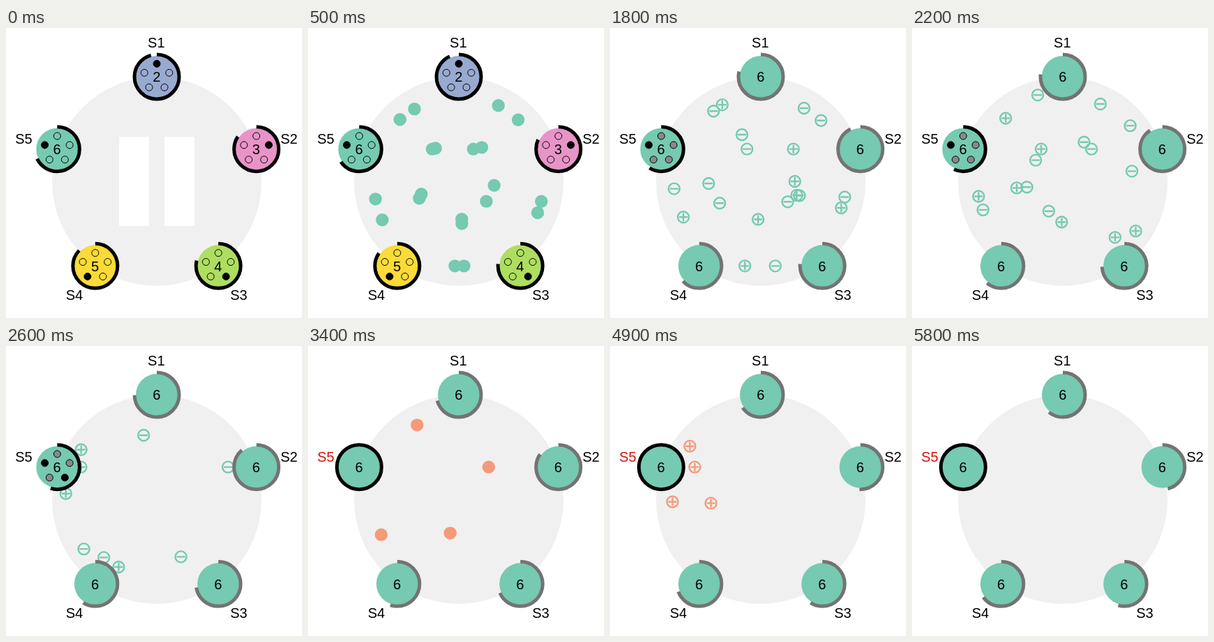
An HTML page with a canvas that plays this animation: 424x416 px, repeating every 5850 ms.

```html
<!DOCTYPE html>
<html lang="en">
<head>
<meta charset="utf-8">
<title>Leader election</title>
<style>
  html, body { margin: 0; width: 100%; height: 100%; overflow: hidden; background: #fff; }
  canvas { display: block; }
</style>
</head>
<body>
<canvas id="stage" width="424" height="416"></canvas>
<script>
const ctx = document.getElementById('stage').getContext('2d');
const LOOP = 5850, STEP = 50, TAU = Math.PI * 2;
const START = 25, WIN = 2621;
const RING = { x: 216, y: 220, r: 150 }, NODE_R = 30, MSG_R = 8;
const DEG_PER_MS = 0.018;
const TEAL = '#75cab1', ORANGE = '#f59a78', GRAY = '#737373';
const TERM_COLORS = { 2: '#99aad1', 3: '#e894c8', 4: '#aedd60', 5: '#fadb37', 6: TEAL };
const LEADER = 4;

// Latencies in ms, [sender][receiver]
const ASK = [
  [0, 1380, 1398, 1376, 1140],
  [1340, 0, 1129, 1097, 1165],
  [1170, 1100, 0, 1090, 1455],
  [1485, 1270, 1050, 0, 1400],
  [1310, 1435, 1338, 1218, 0]
];
const ANSWER = [
  [0, 1087, 1067, 1140, 1415],
  [1158, 0, 1337, 1375, 1161],
  [1117, 1016, 0, 1042, 1175],
  [1390, 1206, 1009, 0, 1485],
  [1181, 1480, 1335, 1461, 0]
];
const BEAT = [1249, 1129, 1339, 1259];
const BEAT_ANSWER = [1254, 1250, 1266, 1263];
// Timer angle at the start and after each reset
const TIMERS = [
  [345, 320, 292, 253],
  [304, 351, 315, 340, 203],
  [284, 319, 283, 229],
  [314, 237, 268],
  [244]
];
const LABELS = [[215.3, 28], [405.5, 166], [333.5, 390], [98, 390], [25.5, 166]];

const around = (x, y, r, i) => ({
  x: x + r * Math.sin(i * TAU / 5),
  y: y - r * Math.cos(i * TAU / 5)
});

const nodes = LABELS.map((label, i) => ({
  ...around(RING.x, RING.y, RING.r, i),
  label,
  history: [{ at: 0, term: i + 2, vote: i }],
  resets: [0],
  won: {}
}));
const messages = [];

function send(from, to, at, latency, color, reply) {
  messages.push({ from, to, at, end: at + latency, color, reply });
  return at + latency;
}

function runElection() {
  const asks = [];
  ASK.forEach((row, from) => row.forEach((latency, to) => {
    if (from !== to) asks.push({ from, to, at: send(from, to, START, latency, TEAL) });
  }));
  asks.sort((a, b) => a.at - b.at);
  for (const { from, to, at } of asks) {
    const voter = nodes[to], term = from + 2;
    const granted = term > voter.history.at(-1).term;
    if (granted) {
      voter.history.push({ at, term, vote: from });
      voter.resets.push(at);
    }
    const back = send(to, from, at, ANSWER[to][from], TEAL, granted ? '+' : '-');
    if (granted) nodes[from].won[to] = back;
  }
  BEAT.forEach((latency, i) => {
    const at = send(LEADER, i, WIN, latency, ORANGE);
    nodes[i].resets.push(at);
    send(i, LEADER, at, BEAT_ANSWER[i], ORANGE, '+');
  });
}

function disc(x, y, r, fill) {
  ctx.beginPath();
  ctx.arc(x, y, r, 0, TAU);
  if (fill) {
    ctx.fillStyle = fill;
    ctx.fill();
  }
}

function drawMessage(m, t) {
  const a = nodes[m.from], b = nodes[m.to];
  const dx = b.x - a.x, dy = b.y - a.y, dist = Math.hypot(dx, dy);
  const p = (t - m.at) / (m.end - m.at);
  const k = (NODE_R + p * (dist - 2 * NODE_R)) / dist;
  const x = a.x + dx * k, y = a.y + dy * k;
  ctx.strokeStyle = m.color;
  ctx.lineWidth = 2.4;
  disc(x, y, MSG_R, m.reply ? null : m.color);
  if (m.reply) {
    ctx.moveTo(x - 6, y);
    ctx.lineTo(x + 6, y);
    if (m.reply === '+') {
      ctx.moveTo(x, y - 6);
      ctx.lineTo(x, y + 6);
    }
  }
  ctx.stroke();
}

const stateAt = (node, t) => node.history.filter(h => h.at <= t).at(-1);

function drawVotes(node, i, t) {
  ctx.strokeStyle = '#000';
  ctx.lineWidth = 1;
  nodes.forEach((peer, j) => {
    const p = around(node.x, node.y, 18.7, j);
    const have = j === i || node.won[j] <= t;
    const coming = stateAt(peer, t).vote === i;
    disc(p.x, p.y, 5, have ? '#000' : coming ? '#888' : null);
    ctx.stroke();
  });
}

function drawNode(node, i, t) {
  const { x, y } = node, { term, vote } = stateAt(node, t);
  const leads = i === LEADER && t >= WIN;
  const running = vote === i && !leads;
  disc(x, y, NODE_R, TERM_COLORS[term]);

  const n = node.resets.filter(at => at <= t).length - 1;
  const angle = leads ? 360 : TIMERS[i][n] - (t - node.resets[n]) * DEG_PER_MS;
  ctx.beginPath();
  ctx.arc(x, y, 32, -TAU / 4, angle / 360 * TAU - TAU / 4);
  ctx.strokeStyle = vote === i ? '#000' : GRAY;
  ctx.lineWidth = 5;
  ctx.stroke();

  if (running) drawVotes(node, i, t);
  ctx.fillStyle = '#000';
  ctx.fillText(term, x - 0.3, y + 7.3);
  ctx.fillStyle = leads ? '#d9140c' : '#000';
  ctx.fillText('S' + (i + 1), ...node.label);
}

function draw(t) {
  ctx.fillStyle = '#fff';
  ctx.fillRect(0, 0, 424, 416);
  disc(RING.x, RING.y, RING.r, '#f0f0f0');
  if (t < STEP) {
    ctx.fillStyle = '#fff';
    ctx.fillRect(162, 156, 43, 128);
    ctx.fillRect(227, 156, 43, 128);
  }
  for (const m of messages) if (t >= m.at && t < m.end) drawMessage(m, t);
  nodes.forEach((node, i) => drawNode(node, i, t));
}

ctx.font = '20px "Liberation Sans", Helvetica, Arial, sans-serif';
ctx.textAlign = 'center';
runElection();

const begin = performance.now();
function frame() {
  const t = (performance.now() - begin) % LOOP;
  draw(Math.floor(t / STEP) * STEP);
  requestAnimationFrame(frame);
}
frame();
</script>
</body>
</html>
```
